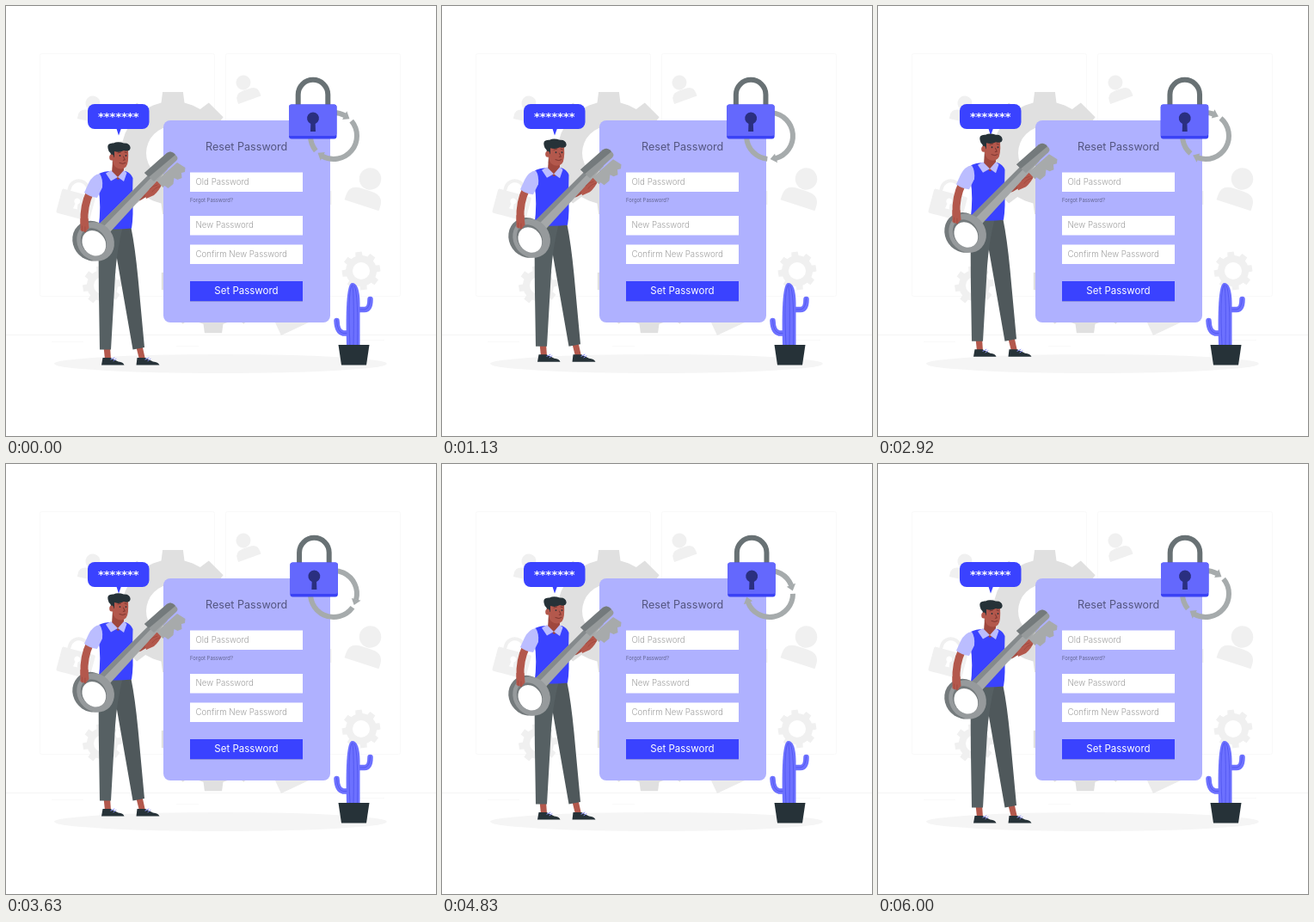
An HTML page that plays this animation: 500 by 500 pixels, repeating every 6.04 s.

```html
<!DOCTYPE html>
<html lang="en">
<head>
<meta charset="utf-8">
<title>Reset password</title>
<style>
  html, body { margin: 0; width: 100%; height: 100%; overflow: hidden; background: #fff; }
  svg { display: block; width: 100%; height: 100%; }
  text { font-family: Inter, "Open Sans", sans-serif; }
  .field { font-size: 9.7px; font-weight: 300; fill: #a0a0a0; }
  .line { fill: none; stroke-linecap: round; stroke-linejoin: round; }
</style>
</head>
<body>
<svg viewBox="0 0 500 500">
  <g id="backdrop">
    <g fill="none" stroke="#f9f9f9">
      <rect x="39.5" y="55.5" width="203" height="282" rx="2"/>
      <rect x="255.5" y="55.5" width="203" height="282" rx="2"/>
      <path d="M0 382.5H500" stroke="#f5f5f5"/>
      <path d="M53 390.5H90M198 395.5H224M397 388.5H440"/>
    </g>
    <g id="gears" fill-rule="evenodd"></g>
    <g id="people" fill="#f0f0f0"></g>
    <g transform="rotate(15 82 228)">
      <path d="M70 219v-5a11 11 0 0 1 22 0v5" fill="none" stroke="#f0f0f0" stroke-width="4"/>
      <rect x="62" y="217" width="40" height="29" rx="2" fill="#f0f0f0"/>
      <path d="M80 236l1-6a3.5 3.5 0 1 1 3 0l1 6z" fill="#fff"/>
    </g>
    <path d="M312 366L320 383L352 368L350 362Z" fill="#ebebeb"/>
    <path d="M376 215h2.5v16H376z" fill="#f0f0f0"/>
  </g>

  <ellipse cx="249.500" cy="416" rx="193.500" ry="11" fill="#f5f5f5"/>

  <g id="panel">
    <rect x="183" y="133" width="194" height="235" rx="8" fill="#afb1ff"/>
    <text x="279.700" y="168" font-size="12.6" text-anchor="middle" fill="#53557f">Reset Password</text>
    <path d="M214 193.500h131v22.500H214zM214 244h131v22.500H214zM214 277.500h131v22.500H214z" fill="#fff"/>
    <text class="field" x="220.500" y="208">Old Password</text>
    <text x="214" y="228.300" font-size="5.9" fill="#62648f">Forgot Password?</text>
    <text class="field" x="220.500" y="258.300">New Password</text>
    <text class="field" x="220.500" y="292">Confirm New Password</text>
    <rect x="214" y="321" width="131" height="23" fill="#8a8dde"/>
    <rect x="214" y="320" width="131" height="23" fill="#3a42ff"/>
    <text x="279.500" y="335.300" font-size="11.5" text-anchor="middle" fill="#fff">Set Password</text>
  </g>

  <g id="arrows"></g>

  <g id="lock">
    <path d="M339.700 117V103a17.300 17.300 0 0 1 34.600 0V117" fill="none" stroke="#687174" stroke-width="6"/>
    <rect x="329" y="114.500" width="55.500" height="40" rx="3" fill="#3a42f5"/>
    <path d="M332 114.500h49.500q3 0 3 3V148q0 3-3 3H329V117.500q0-3 3-3z" fill="#6468fd"/>
    <path d="M354 146l.3-9a7 7 0 1 1 5.400 0l.3 9z" fill="#2a2f80"/>
  </g>

  <g id="cactus">
    <g class="line" stroke="#6d71ff" stroke-width="6.500">
      <path d="M406 353H417Q423.500 353 423.500 341"/>
      <path d="M402 380.500H392Q385 379 384.500 366"/>
    </g>
    <path d="M396 395Q394 322 402.500 322Q411 322 411.500 345V395z" fill="#6d71ff"/>
    <g class="line" stroke="#4a50ec" stroke-width="0.700">
      <path d="M400 394Q397 335 402 325M404 394Q405 340 403 324M408.500 394Q410 335 405 325"/>
      <path d="M412 353H417Q423 352 423.500 340M396 380.500H392Q385 379 384.500 365"/>
    </g>
    <path d="M386.500 394h36l-3.500 23.500h-29z" fill="#263238"/>
  </g>

  <g id="bubble">
    <path d="M128 141h6.500l-3.500 9.500z" fill="#3a42ff"/>
    <rect x="95" y="114" width="71.500" height="29" rx="8" fill="#3a42ff"/>
    <text x="130.800" y="133.300" text-anchor="middle" fill="#fff" style="font:bold 13px 'DejaVu Sans',sans-serif">*******</text>
  </g>

  <g id="man">
    <g id="legs">
      <path d="M113.500 396h7.500l1 15h-7zM151 395h7.500l3.500 16h-7z" fill="#b3584c"/>
      <path d="M111 417.500l1.500-8.500h9l9 4.500q6 .5 7 4zM151.500 417.500l1-8.500h9.500l9 4.500q6 .5 7.500 4z" fill="#263238"/>
      <path class="line" d="M122 411l4-2M125 412.500l3-2M162 411l4-2M165 412.500l3-2" stroke="#8d92ff"/>
      <path d="M122 258h23.500Q150 280 153.500 316L161 397l-13.500 2.500Q138 345 128 288z" fill="#4f585b"/>
      <path d="M107.500 258h28Q129 284 127 312L122 399.500h-13Q107.500 330 107.500 258z" fill="#566063"/>
    </g>
    <g id="far-arm">
      <path class="line" d="M155 222L170 213" stroke="#a64e43" stroke-width="8"/>
      <path d="M160 212L174 203L182 206Q178 215 172 220L163 224z" fill="#b3584c"/>
    </g>
    <g id="torso">
      <path d="M108 195Q114 192 122 192L139 192Q145 194 147.500 200L147 222Q148.500 244 146 258.500Q128 260.500 107.500 258.500Q111 232 107.500 212z" fill="#3a42ff"/>
      <path d="M124 181h13v14q-4 6-7 7l-7-8z" fill="#9f473d"/>
      <path d="M122 191l8 8-8 4.500-6-9zM137 191l-7 8 7 5 3.500-10z" fill="#bbbdff"/>
    </g>
    <g id="head">
      <path d="M122 165Q130 160 142 167Q143 183 139.500 187Q134 192 127 187Q123 183 122 165z" fill="#b3584c"/>
      <path d="M118.500 165.500Q117 159 125 159.500Q130 157 137 159.500Q144 159 144.700 165Q144 170 137 168Q132 171 126 169V176Q122 176 121.500 171Q119 169 118.500 165.500z" fill="#263238"/>
      <ellipse cx="122.800" cy="176" rx="2.600" ry="3.500" fill="#b3584c"/>
      <path class="line" d="M130 171l3.500-1M138 170l2.500 .8M136.500 175l1.800 4-2 .3M132 182.500q4 2 7 0" stroke="#6f2d29" stroke-width="0.800"/>
      <circle cx="132.500" cy="174" r=".9" fill="#263238"/>
      <circle cx="139.500" cy="174" r=".9" fill="#263238"/>
    </g>
    <g id="key">
      <path d="M175 203L199 182l9.500 6-.5 5-4 1 .5 6-5 2-4-2-1 7-6 5-4-3-2 2z" fill="#a7aaab"/>
      <path d="M108 254L180 182l8 8L120 264z" fill="#a5a8a9"/>
      <path d="M108 254L180 182l3 3L112 258z" fill="#858a8c"/>
      <path d="M161 194L187 171q4-3 8 0l3 3q3 3 0 6L172 204z" fill="#969a9b"/>
      <path d="M161 194L187 171q4-3 8 0l2 2L166 199z" fill="#747a7c"/>
      <g transform="rotate(-35 102 273.500)">
        <ellipse cx="100.500" cy="272" rx="22" ry="24" fill="#747a7c"/>
        <ellipse cx="103.500" cy="275" rx="21" ry="23.500" fill="#969a9c"/>
        <ellipse cx="101.500" cy="274" rx="14" ry="17" fill="#747a7c"/>
        <ellipse cx="101" cy="275.500" rx="13" ry="15.500" fill="#fff"/>
      </g>
    </g>
    <path class="line" d="M176 208q-6 1-9 5M179 210q-6 1-9 6" stroke="#9f473d" stroke-width="0.800"/>
    <path class="line" d="M98 216Q90 232 91 252" stroke="#b3584c" stroke-width="9"/>
    <path d="M86.500 247h9l1 11-4 5-6-2z" fill="#b3584c"/>
    <path class="line" d="M88.500 256v6M92 257v6" stroke="#9f473d" stroke-width="0.700"/>
    <path d="M109 195Q101 196 96 206L91 217Q97 222 106 223L112 211Q113 201 109 195z" fill="#bbbdff"/>
  </g>
</svg>
<script>
const LOOP = 6040, ACTIVE = 6000, SHAKE = 3000, FLOAT = 10;
const $ = id => document.getElementById(id);
const polar = (cx, cy, r, deg) => {
  const a = deg * Math.PI / 180;
  return [cx + r * Math.cos(a), cy + r * Math.sin(a)].map(v => v.toFixed(2)).join(' ');
};

function gear(cx, cy, inner, outer, hole, color, turn = 0) {
  const points = [];
  for (let i = 0; i < 8; i++) {
    const mid = i * 45 + turn;
    for (const [r, d] of [[inner, -13], [outer, -9.5], [outer, 9.5], [inner, 13]])
      points.push(polar(cx, cy, r, mid + d));
    points.push(polar(cx, cy, inner, mid + 22.5));
  }
  const ring = `M${cx - hole} ${cy}a${hole} ${hole} 0 1 0 ${2 * hole} 0a${hole} ${hole} 0 1 0 ${-2 * hole} 0z`;
  return `<path fill="${color}" d="M${points.join('L')}z${ring}"/>`;
}

const person = (x, y, size, tilt) => `
  <g transform="translate(${x} ${y}) rotate(${tilt}) scale(${size})">
    <circle r="8.500"/>
    <path d="M-14 21.500V18Q-14 9 -4 9H4Q14 9 14 18V21.500z"/>
  </g>`;

// The arrow ring is built around its own centre, two halves half a turn apart.
function arrow(turn) {
  const tip = turn - 47, base = tip - 15;
  return `<path d="M${polar(0, 0, 27, tip - 173)}A27 27 0 0 1 ${polar(0, 0, 27, base + 1)}"
      fill="none" stroke="#a6abac" stroke-width="6"/>
    <path d="M${polar(0, 0, 32.5, base)}L${polar(0, 0, 27, tip)}L${polar(0, 0, 21.5, base)}z" fill="#a6abac"/>`;
}

$('gears').innerHTML =
  gear(194, 171, 60, 72, 31, '#e0e0e0') +
  gear(241, 320, 51, 61, 25, '#e0e0e0') +
  gear(413, 308, 18, 22.5, 10, '#f0f0f0', -8) +
  gear(112, 325, 18, 23, 10, '#f0f0f0', -8);
$('people').innerHTML =
  person(276, 89, 1, -20) + person(423.5, 201, 1.5, 18) + person(101, 113, 1, 12);
$('arrows').innerHTML = arrow(0) + arrow(180);

const shakeStops = [0, -1, 2, -4, 4, -4, 4, -4, 2, -1, 0];
function shake(phase) {
  const pos = phase * 10, i = Math.floor(pos);
  return shakeStops[i] + (shakeStops[i + 1] - shakeStops[i]) * (pos - i);
}

function draw(time) {
  const t = time % LOOP % ACTIVE;
  const phase = t % SHAKE / SHAKE;
  const lift = FLOAT * (1 - Math.abs(1 - 2 * t / ACTIVE));
  $('man').setAttribute('transform', `translate(0 ${-lift})`);
  $('lock').setAttribute('transform', `translate(${shake(phase)} 0)`);
  $('arrows').setAttribute('transform', `translate(381 151) rotate(${360 * phase})`);
}

const start = performance.now();
function tick() {
  draw(performance.now() - start);
  requestAnimationFrame(tick);
}
tick();
</script>
</body>
</html>
```
